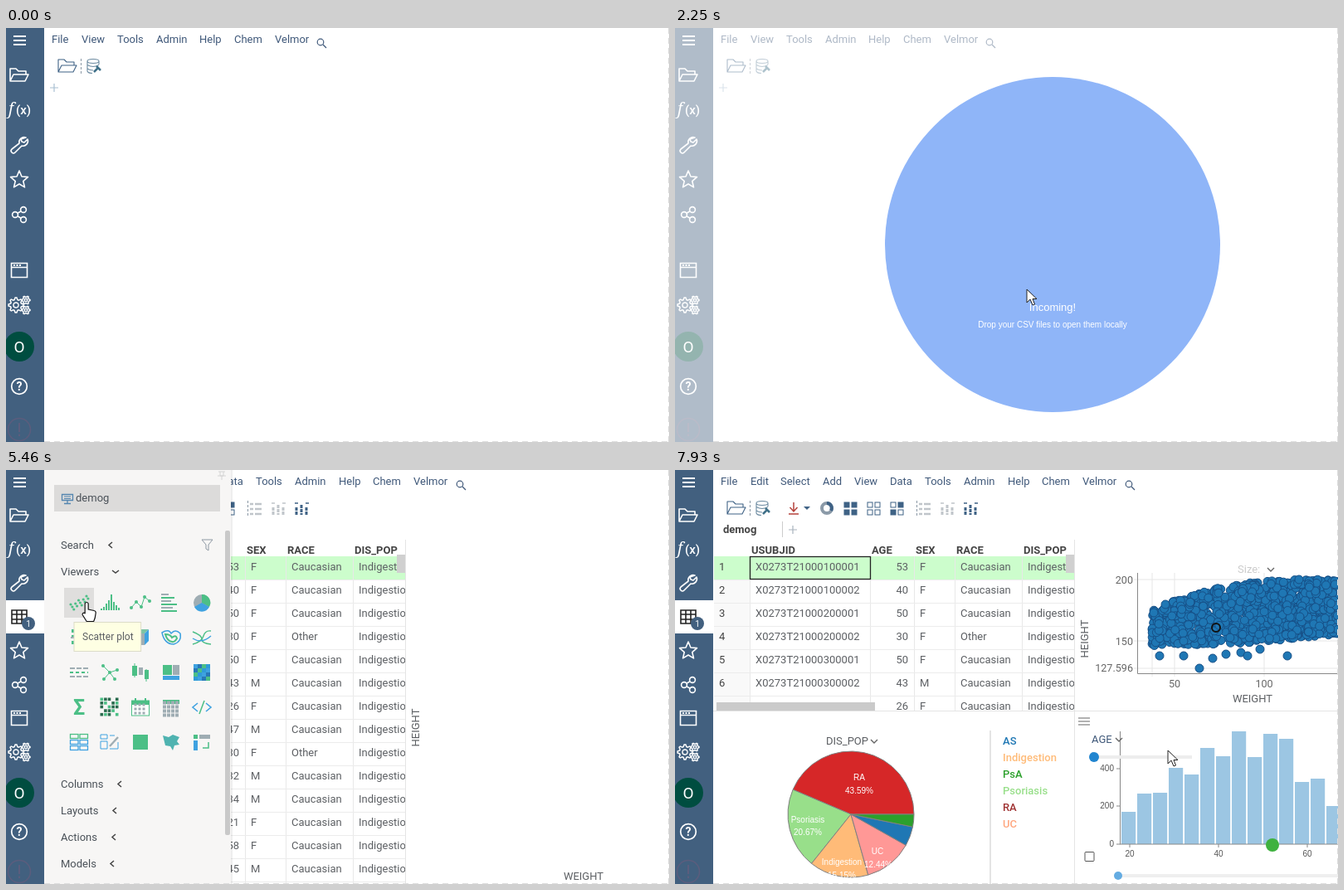
Write an HTML page that moves like this. It is 799 by 499 pixels and loops after 8000 ms.

```html
<!DOCTYPE html>
<html lang="en">
<head>
<meta charset="utf-8">
<title>CSV drop demo</title>
<style>
html, body { margin: 0; width: 100%; height: 100%; overflow: hidden; background: #fff; }
svg { display: block; }
text { font: 13px Roboto, sans-serif; fill: #5c5f63; white-space: pre; }
.b { font-weight: 700; fill: #444; }
.menu { fill: #40597a; }
.panel text { fill: #4a5158; }
.win text { font: 12.6px "Open Sans", sans-serif; fill: #222; }
.win .file { font-size: 14.2px; }
.small { font: 10px "Liberation Sans", Arial, sans-serif; fill: #555; }
.white { fill: #fff; }
.axis { font-size: 12.6px; fill: #666; }
</style>
</head>
<body>
<script>
const R = (x, y, w, h, fill, more = '') => `<rect x="${x}" y="${y}" width="${w}" height="${h}" fill="${fill}" ${more}/>`;
const C = (x, y, r, fill, more = '') => `<circle cx="${x}" cy="${y}" r="${r}" fill="${fill}" ${more}/>`;
const L = (d, color, w = 1, more = '') => `<path d="${d}" stroke="${color}" stroke-width="${w}" fill="none" ${more}/>`;
const T = (x, y, s, more = '') => `<text x="${x}" y="${y}" ${more}>${s}</text>`;
const at = (x, y, s) => `<g transform="translate(${x} ${y})">${s}</g>`;
const G = (id, s, more = '') => `<g id="${id}" ${more}>${s}</g>`;
const range = (n, f) => Array.from({ length: n }, (_, i) => f(i)).join('');
const mid = 'text-anchor="middle"', end = 'text-anchor="end"';
const navy = '#42607f', ink = '#3f6285';

let seed = 7;
const rand = () => (seed = seed * 16807 % 2147483647) / 2147483647;

// ---- left bar ----
function gear(x, y, r, n) {
  const pts = range(n * 4, i => {
    const a = (i - .5) * Math.PI / (2 * n), q = i % 4 < 2 ? r : r * .74;
    return `${i ? 'L' : 'M'}${x + q * Math.cos(a)} ${y + q * Math.sin(a)}`;
  });
  return L(pts + 'Z', '#fff', 1.5) + C(x, y, r * .34, 'none', 'stroke="#fff" stroke-width="1.4"');
}
const star = range(10, i => {
  const a = i * Math.PI / 5 - Math.PI / 2, q = i % 2 ? 5 : 11;
  return `${i ? 'L' : 'M'}${q * Math.cos(a)} ${q * Math.sin(a)}`;
}) + 'Z';
const folder = (color, w) => L('M-11 7V-8h7l3 3h9v4M-11 7l4-8h18l-4 8z', color, w, 'stroke-linejoin="round"');
const sideIcons = {
  menu: L('M-7-5H8M-7 0H8M-7 5H8', '#fff', 1.8),
  folder: folder('#fff', 1.6),
  fx: T(-13, 5, 'f', 'class="white" style="font:italic 19px \'Noto Serif\',serif"') +
      T(-4, 5, '(x)', 'class="white" style="font-size:15px;font-weight:500"'),
  wrench: L('M8-9a6 6 0 0 0-8 7L-9 5a2.7 2.7 0 0 0 4 4L3 1a6 6 0 0 0 7-8L6-3 3-4 2-7z', '#fff', 1.6, 'stroke-linejoin="round"'),
  star: L(star, '#fff', 1.6, 'stroke-linejoin="round"'),
  share: L('M5-6L-5 0L5 6', '#fff', 1.6) +
    [[5, -6], [-5, 0], [5, 6]].map(p => C(...p, 3.4, navy, 'stroke="#fff" stroke-width="1.6"')).join(''),
  window: L('M-9.500-8.500h19v17h-19zM-9-3.500h18', '#fff', 1.6) + range(3, i => R(-7 + i * 3.5, -7, 2, 2, '#fff')),
  gears: gear(-4, 0, 9, 8) + gear(8, -6, 5, 6) + gear(8, 6, 5, 6),
  user: C(0, 0, 18, '#004d40') + T(0, 7, 'O', `class="white" ${mid} style="font-size:19px"`),
  help: C(0, 0, 9.3, 'none', 'stroke="#fff" stroke-width="1.7"') + T(0, 5, '?', `class="white" ${mid} style="font-weight:700;font-size:14px"`),
  alert: C(0, 0, 13.5, 'none', 'stroke="#5b5d7d" stroke-width="1.6"') + L('M0-8V3M0 5.500v2.500', '#5b5d7d', 2),
  table: R(-16, -20, 46, 40, '#fff') + L('M-9-8H9V8H-9zM-9-3H9M-9 3H9M-3-8V8M3-8V8', '#222', 1.6) +
    C(11, 8, 8, navy) + T(11, 11.5, '1', `class="white" ${mid} style="font-size:10px"`),
};
const sidebar = places => R(0, 0, 46, 499, navy) +
  Object.entries(places).map(([k, y]) => at(16, y, sideIcons[k])).join('');

// ---- top of the app ----
const menu = items => Object.entries(items).map(([s, x]) => T(x, 18, s, 'class="menu"')).join('');
const search = x => C(x - 1, 17, 3.8, 'none', 'stroke="#40597a" stroke-width="1.2"') + L(`M${x + 2} 20l4 4`, '#40597a', 1.3);
const dash = x => L(`M${x}.5 37V56`, '#8a97a5', 1, 'stroke-dasharray="3 2"');
const plus = (x, color) => L(`M${x - 5} 72h10M${x} 67v10`, color, 1.2);
const files = at(74, 46, folder(ink, 1.1)) + dash(90) +
  at(106, 46, L('M-8-6a7 2.500 0 0 1 14 0a7 2.500 0 0 1-14 0V6q1 2.500 6 2.500M-8-1.500q7 4 14 0M-8 3q3 2 7 2M6-6v4', '#6c8aa0', 1.1) +
    L('M0 7l5-5M3 0l5 5', '#3f7088', 2.5));
const squares = (x, fills) => range(4, i => R(x - 7 + i % 2 * 9, 39 + (i > 1) * 9, 6, 6, fills.includes(i) ? ink : 'none', `stroke="${ink}"`));
const bars = (x, color) => L(`M${x - 6} 45v9M${x} 42v12M${x + 6} 45v9`, color, 3, 'stroke-dasharray="4 1"') + L(`M${x - 8} 40h4M${x + 5} 40h4`, color, 1.5);
const caret = (x, y) => L(`M${x - 4} ${y - 2}l4 4l4-4`, '#666', 1.4);

const startView = R(46, 0, 753, 499, '#fff') +
  menu({ File: 55, View: 91, Tools: 134, Admin: 181, Help: 233, Chem: 275, Velmor: 324 }) +
  search(380) + files + plus(58, '#a9c0d2') +
  sidebar({ menu: 15, folder: 57, fx: 99, wrench: 141, star: 183, share: 225, window: 292, gears: 334, user: 384, help: 432, alert: 484 });

const tableTop = menu({ File: 55, Edit: 91, Select: 127, Add: 178, View: 216, Data: 259, Tools: 301, Admin: 348, Help: 401, Chem: 442, Velmor: 491 }) +
  search(548) + files +
  L('M143 39v10M138.500 45l4.500 5l4.500-5M137 53h12', '#b5433c', 1.5) + `<path d="M155 44h8l-4 4z" fill="${ink}"/>` +
  C(183, 46, 6, 'none', 'stroke="#8b9aa8" stroke-width="4"') + L('M183 40a6 6 0 0 1 5 9', ink, 4) +
  squares(211, [0, 1, 2, 3]) + squares(239, []) + squares(267, [1, 2]) + dash(291) +
  L('M294 41h4M294 47h4M294 53h4M300 41h8M300 47h8M300 53h8', '#c0c5ca', 2.4) + bars(328, '#c0c5ca') + bars(356, ink) +
  T(58, 76, 'demog', 'class="b"') + L('M129.500 62v19', '#ccc') + plus(142, '#a9b4be');

// ---- grid ----
const rows = `53 F Caucasian 160.484 73.20 0|40 F Caucasian 163.646 93.00 1|50 F Caucasian 158.027 62.70 1
30 F Other 158.419 64.50 1|50 F Caucasian 161.695 67.60 0|43 M Caucasian 188.234 91.00 0|26 F Caucasian 174.705 74.10 0
47 M Caucasian 175.228 85.10 1|30 F Other 150.288 64.00 0|32 M Caucasian 180.298 67.00 1|34 M Caucasian 175.351 115.30 0
21 F Caucasian 155.091 70.50 0|58 F Caucasian 174.066 90.00 1|45 M Caucasian 183.830 67.10 0`.split(/[|\n]/).map(r => r.split(' '));
const ids = [2, 2, 8, 2].flatMap((n, g) => Array.from({ length: n }, (_, i) => `X0273T21000${(g + 1) * 100000 + i + 1}`));
const row = ([age, sex, race, height, weight, on], i) => {
  const y = 121 + i * 28;
  return T(53, y, i + 1, 'style="fill:#444"') + T(97, y, ids[i]) + T(281, y, age, end) + T(295, y, sex) + T(344, y, race) +
    T(425, y, 'Indigestion') + T(566, y, height, end) + T(638, y, weight, end) + T(653, y, `${age} ${race[0]} ${sex}`) +
    R(752.5, y - 9.5, 11, 11, '#fff', 'stroke="#777" rx="1"') + (on > 0 ? L(`M755 ${y - 4}l2.500 2.500l4.500-5`, '#666', 1.3) : '') +
    L(`M47 ${y + 11}.5H799`, '#ececec');
};
const heads = { USUBJID: 92, AGE: 237, SEX: 290, RACE: 339, DIS_POP: 420, HEIGHT: 504, WEIGHT: 575, DEMOG: 648, CONTROL: 718 };
const grid = R(46, 84, 753, 415, '#fff') + R(47, 104, 43, 395, '#f9f9f9') + R(47, 104, 752, 28, '#ccfdcc') +
  G('hover', R(47, 0, 752, 28, '#eef3f8') + R(47, 0, 3, 28, '#66a3c7')) +
  Object.entries(heads).map(([s, x]) => T(x, 101, s, 'class="b"')).join('') +
  [90, 235, 288, 337, 418, 502, 568, 646, 716].map(x => L(`M${x}.5 104V499`, '#e8e8e8')).join('') +
  rows.map(row).join('') + R(90.5, 104.5, 145, 27, 'none', 'stroke="#222" stroke-width="1.3"') +
  G('barFull', R(46, 493, 753, 6, '#d6d6d6'));

// ---- charts ----
const cloud = Array.from({ length: 1050 }, () => {
  const u = rand() ** .85, top = 132 + 38 * (1 - u) ** 3, low = 213 - 16 * u * u;
  return [575 + 226 * u, top + (low - top) * rand()];
}).concat([[632, 239], [648, 227], [613, 224], [584, 224], [738, 224], [577, 172], [664, 222], [682, 220], [690, 224], [705, 216], [591, 162], [752, 132]]);
function scatter(bottom) {
  const Y = y => 124 + (y - 124) * (bottom - 124) / 121, hMid = (124 + bottom) / 2 + 19;
  const ring = (x, y, fill, s) => C(x.toFixed(1), Y(y).toFixed(1), 5, fill, s);
  return {
    names: T(696, bottom + 35, 'WEIGHT', mid) + T(0, 0, 'HEIGHT', `${mid} transform="translate(498 ${hMid}) rotate(-90)"`),
    plot: [132, 206, 239].map(y => L(`M553 ${Y(y)}H799`, '#e6e6e6')).join('') +
      [575, 602, 710].map(x => L(`M${x} 124V${bottom + 4}`, '#e6e6e6')).join('') +
      `<g stroke="#174f86" stroke-width="1">${cloud.map(p => ring(...p, '#1f77b4')).join('')}</g>` +
      ring(652, 190, 'none', 'stroke="#111" stroke-width="2"') +
      L(`M557.500 124V${bottom}.5H799`, '#888') +
      T(552, Y(132) + 5, '200', `class="axis" ${end}`) + T(552, Y(206) + 5, '150', `class="axis" ${end}`) +
      T(552, Y(239) + 4, '127.596', `class="axis" ${end}`) + T(602, bottom + 17, '50', `class="axis" ${mid}`) +
      T(710, bottom + 17, '100', `class="axis" ${mid}`) + T(678, 124, 'Size:', 'style="fill:#ccc"') + caret(718, 120),
  };
}
const tall = scatter(459), half = scatter(245);

const hist = R(482, 291, 317, 208, '#fff') + L('M482 290.500H799', '#e4e4e4') +
  [39, 61, 62, 92, 84, 116, 106, 136, 105, 133, 127, 75, 79, 46].map((h, i) => R(538 + i * 19, 451 - h, 17.2, h, '#9cc6e3')).join('') +
  L('M536.500 315V451H799M532 360h5M532 405h5M532 451h5M548 451v4M655 451v4M762 451v4', '#888') +
  [[363, 400], [408, 200], [454, 0]].map(([y, s]) => T(529, y, s, `class="small" ${end}`)).join('') +
  [20, 40, 60].map((s, i) => T(548 + i * 107, 466, s, `class="small" ${mid}`)).join('') +
  T(502, 329, 'AGE', 'class="menu"') + caret(535, 325) + R(505, 344, 118, 4, '#ededed') + C(505, 346, 6, '#2185d0') +
  C(720, 452, 8, '#3fb23f') + R(494, 460.5, 11, 11, '#fff', 'stroke="#555" rx="1"') +
  G('histTools', L('M486 299h14M486 303h14M486 307h14', '#999', 1.4) + R(534, 487, 265, 4, '#efefef') + C(534, 489, 5, '#64ace2'));

const pieParts = [['#d62728', 43.59], ['#98df8a', 20.67], ['#ffbb78', 15.15], ['#ff9896', 12.44], ['#1f77b4', 4.95], ['#2ca02c', 3.2]];
let turn = 0;
const spot = p => `${212 + 76 * Math.cos(p * Math.PI / 50)} ${415 - 76 * Math.sin(p * Math.PI / 50)}`;
const slices = pieParts.map(([color, share]) => {
  const from = spot(turn);
  turn += share;
  return `<path d="M212 415L${from}A76 76 0 0 0 ${spot(turn)}Z" fill="${color}" stroke="#808080"/>`;
}).join('');
const pie = R(46, 291, 435, 208, '#fff') + L('M46 290.500H481M481.500 290V499', '#e4e4e4') +
  T(182, 331, 'DIS_POP') + caret(240, 327) + slices +
  [['RA', 222, 374], ['43.59%', 222, 390], ['Psoriasis', 160, 425], ['20.67%', 160, 440], ['Indigestion', 201, 476],
   ['15.15%', 201, 492], ['UC', 244, 463], ['12.44%', 245, 479]].map(([s, x, y]) => T(x, y, s, `class="small white" style="fill:#fff" ${mid}`)).join('') +
  L('M380 314V499', '#e4e4e4', 2) +
  [['AS', '#1f77b4'], ['Indigestion', '#ffbb78'], ['PsA', '#2ca02c'], ['Psoriasis', '#98df8a'], ['RA', '#a03434'], ['UC', '#ffa77f']]
    .map(([s, c], i) => T(395, 331 + i * 20, s, `style="fill:${c};font-weight:500"`)).join('');

// ---- viewers panel ----
const gr = '#4cbf86', gy = '#9fadb3', bl = '#3fa2e0';
const matrix = (n, step, size, color) => range(n * n, i => R(-(n * step) / 2 + i % n * step, -(n * step) / 2 + (i / n | 0) * step, size, size, color(i)));
const dots = (pts, color) => pts.map(p => C(...p, 2, color)).join('');
const zigzag = [[-11, 6], [-5, -1], [1, 5], [5, -7], [11, -2]];
const viewers = [
  range(12, i => C(-10 + i * 1.9, 6 - i + ((i * 7) % 5 - 2) * 2, 1.6, gr)),
  [2, 4, 8, 12, 19, 10, 6, 3].map((h, i) => R(-11 + i * 3, 9 - h, 2, h, gr)).join(''),
  L('M' + zigzag.join('L'), gr) + dots(zigzag, gr),
  [9, 16, 12, 19, 14, 19].map((w, i) => R(-12, -11 + i * 4, w, 2, i % 2 ? gr : gy)).join(''),
  C(0, 0, 10, gy) + `<path d="M0 0V-10A10 10 0 0 1 9 5z" fill="${gr}"/><path d="M0 0L9 5A10 10 0 0 1-9 5z" fill="${bl}"/>`,
  L('M-7-10V10M0-10V10M7-10V10', gr, 4, 'stroke-dasharray="4 3"') + L('M-10 0H10', gy, 2),
  matrix(5, 4.4, 3, i => i % 3 ? gy : gr),
  R(-10, -5, 15, 14, gy) + `<path d="M-10-5l5-5H10L5-5z" fill="#7cc4a4"/><path d="M5-5l5-5V4L5 9z" fill="${bl}"/>`,
  L('M-11-6q8-5 11 1q5-6 11 0q2 10-8 13Q-8 8-11-6z', bl, 1.5) + L('M-7-4q6 0 8 4q5-4 6 1q-3 5-6 4Q-5 4-7-4z', gr, 2),
  L('M-11-7Q0-3 0 2T11 8M-11 8Q0 5 2-2T11-8', gr, 1.4) + L('M-11 1Q0 8 11-2', bl, 1.4),
  L('M-11-5H11M-11 5H11', gy, 2, 'stroke-dasharray="6 2"') + L('M-11 0H11', gr, 2, 'stroke-dasharray="4 3"'),
  L('M-8-8L0 0L9-3M0 0L-7 8M0 0L6 8', gr) + dots([[-8, -8], [0, 0], [9, -3], [-7, 8], [6, 8]], gr),
  L('M-7-11V6M7-4V11', gr) + R(-10, -8, 6, 12, gr) + R(-2, -6, 5, 9, gy) + R(5, -3, 5, 11, gr),
  R(-10, -9, 11, 12, gr) + R(2, -9, 8, 12, gy) + R(-10, 4, 20, 5, bl),
  matrix(4, 5, 5, i => [bl, '#2878b8', gr, '#2f9bd8'][(i * 5 + (i >> 2)) % 4]),
  T(0, 9, 'Σ', `${mid} style="font:700 25px Roboto,sans-serif;fill:${gr}"`),
  matrix(5, 4.6, 3.6, i => i * 7 % 4 === 1 ? '#fff0' : i % 3 ? '#2a6b4e' : gr),
  R(-10.5, -8, 21, 18, '#fff', `stroke="${gr}"`) + R(-11, -8, 22, 5, gr) + at(0, 3, matrix(3, 5, 3, () => gy)) + L('M-6-11v4M6-11v4', gr, 2),
  R(-10, -9, 20, 5, gr) + at(0, 2.5, matrix(4, 5, 4, () => gy)),
  L('M-5-5l-6 5l6 5M5-5l6 5l-6 5', bl, 1.6) + L('M3-8L-3 8', gr, 1.6),
  range(6, i => R(-10.5 + i % 2 * 11.5, -9.5 + (i / 2 | 0) * 7, 9.5, 5, 'none', `stroke="${i < 2 ? gr : bl}" stroke-width="1.3"`)),
  L('M-11-9h8v5h-8zM-11-1h8v9h-8zM0 8h10V0M0-8h6', bl) + L('M0 5L10-6', gy, 2.4),
  R(-9, -9, 18, 18, gr),
  '<path d="M-10-8l7 2l5-3l8 3l-3 5l3 4l-6 1l-2 6l-3-5l-6-1z" fill="#4fb3b0"/>',
  R(-10, -9, 5, 5, gr) + R(-3, -9, 13, 5, gy) + R(-10, -2, 5, 12, bl) + L('M1 7h7V0', gr, 1.5),
];
const section = (s, y, x, open) => T(66, y + 4.5, s) + L(open ? `M${x - 3} ${y - 1}l4 3l4-3` : `M${x + 2} ${y - 3}l-4 3.500l4 3.500`, '#444', 1.5);
const panel = R(46, 0, 225, 499, '#f7f6f5') + R(271, 0, 2, 499, '#0001') + R(58, 18, 200, 32, '#dcdbda') +
  L('M67.500 29.500h13v7h-13zM74 37v3M70 40.500h8', '#5486b0', 1.3) + L('M70 32h8M70 34.500h8', '#5486b0') + T(84, 38, 'demog') +
  section('Search', 90, 126) + section('Viewers', 122, 131, true) + section('Columns', 378, 137) + section('Layouts', 410, 131) +
  section('Actions', 442, 130) + section('Models', 474, 128) +
  L('M236 84h13l-5 6v7l-3-2v-5z', '#8d98a3') + L('M256 2h8M258 2v5h4V2M255 7h10M260 7v5', '#d4d4d4') +
  G('cell', R(70, 142, 36, 36, '#dfdedd')) +
  viewers.map((s, i) => at(88 + i % 5 * 37, 160 + (i / 5 | 0) * 42, s)).join('') +
  G('panelBar', R(264, 73, 6, 367, '#c9c9c9', 'rx="2"'));

// ---- file window ----
const yellowFolder = (x, y) => `<path d="M${x - 6} ${y - 8}h10l2 3v12h-12z" fill="#f7d271"/>` + R(x - 6, y - 4, 9, 12, '#ffe39a');
const sheet = (x, y) => `<path d="M${x} ${y}h10l4 4v14h-14z" fill="#fff" stroke="#888"/>`;
const thumb = (y, wide) => R(728, y - 7, 17, 13, '#fff', 'stroke="#555"') + R(730, y - 5, wide ? 13 : 6, 5, '#6aa5d8') + R(730, y, wide ? 13 : 6, 4, '#5b6b4b');
const win = R(606, 5, 193, 494, '#0002') + R(608, 7, 191, 492, '#fff', 'stroke="#999"') +
  yellowFolder(626, 27) + L('M643.500 19v16M731.500 19v16', '#777') + R(659.5, 18.5, 13, 16, '#fff', 'stroke="#8a6a4a"') +
  L('M662 27l3 4l6-8', '#d07a2a', 2) + yellowFolder(691, 27) + L('M709.500 25h8', '#222') + '<path d="M710 28h7l-3.500 4z" fill="#222"/>' +
  T(738, 32, 'Plomrix files', 'class="file"') +
  R(609, 45, 70, 28, '#0566c4') + T(643, 64, 'File', `${mid} style="fill:#fff"`) + T(713, 64, 'Home', mid) + T(766, 64, 'Share') +
  R(609, 73, 190, 114, '#f5f6f7') + L('M609 73.500H799M609 187H799M719.500 78V182', '#dcdcdc') +
  R(632, 87, 35, 28, '#fff', 'stroke="#777"') + R(633, 92, 14, 22, '#3e97dc') + R(632, 87, 35, 4, '#9aa4ac') +
  [94, 131].map(y => R(688.5, y, 17, 13, '#fff', 'stroke="#888"') + R(697, y + 3, 8, 9, '#4a97d2')).join('') +
  T(650, 138, 'Navigation', mid) + T(630, 155, 'pane') + '<path d="M662 148h7l-3.500 4z" fill="#333"/>' + T(663, 180, 'Panes', mid) +
  R(723.5, 81.5, 90, 74, '#fff', 'stroke="#d5d5d5"') + thumb(94, true) + thumb(118, false) +
  L('M728 136h4v4h-4zM728 145h4v4h-4zM738 136h4v4h-4zM738 145h4v4h-4z', '#4a7fae', 1.4) + L('M733 138h3M733 147h3M743 138h3M743 147h3', '#444') +
  T(751, 99, 'Extra large icons') + T(751, 123, 'Medium icons') + T(751, 147, 'List') +
  L('M640 212h-14M632 206l-6 6l6 6M727 219v-13M721 211l6-6l6 6', '#555', 1.5) + L('M664 212h14M672 206l6 6l-6 6', '#d0d0d0', 1.5) +
  L('M698 210l4 4l4-4M781 243l5-4l5 4', '#666', 1.3) + R(743.5, 192.5, 80, 38, '#fff', 'stroke="#d0d0d0"') +
  yellowFolder(755, 212) + T(773, 216, '«', 'class="file"') + T(791, 217, 'Projects', 'class="file"') +
  T(630, 260, 'Name', 'class="file" style="fill:#5b6b75"') +
  G('pick', R(627.5, 305.5, 180, 27, '#cce8ff', 'stroke="#99d1ff"')) +
  ['calendar', 'demog', 'earnings-by-state', 'gapminder'].map((s, i) => sheet(636, 282 + i * 27) + T(657, 298 + i * 27, s + '.csv', 'class="file"')).join('');

const dropZone = R(0, 0, 799, 499, '#fff', 'opacity=".58"') + C(455, 261, 202, '#8fb5f8', 'id="disc"') +
  T(455, 341, 'Incoming!', `${mid} class="small" style="font-size:13px;fill:#fff"`) +
  T(455, 361, 'Drop your CSV files to open them locally', `${mid} class="small" style="fill:#fff"`);

const ghost = '<g opacity=".9">' + R(-46, -114, 131, 130, '#0002', 'rx="2"') + R(-47.5, -115.5, 130, 130, 'url(#ice)', 'stroke="#a8cfe6" rx="2"') +
  '<path d="M-22-105h57l23 23V4h-80z" fill="#f6f8f9" stroke="#a5b0b8"/><path d="M35-105v23h23z" fill="#dde4e8" stroke="#a5b0b8"/></g>' +
  R(31.5, 16.5, 67, 24, '#fff', 'stroke="#777"') + L('M37 28.500h14M44 21.500v14', '#1a6ac0', 2) +
  T(56, 34, 'Copy', 'style="font:14.6px \'Open Sans\',sans-serif;fill:#1c5fb0"');
const pointer = G('click', C(-1, -2, 15, '#f7ee60', 'opacity=".85"')) +
  G('arrow', '<path d="M0 0V16l4-4l3 7l2.500-1L7 11.500h5z" fill="#fff" stroke="#222"/>') +
  G('hand', '<path d="M-2 1.500a2 2 0 0 1 4 0V8l7 1.500a2.500 2.500 0 0 1 2 3l-1 6l-1.500 4H0l-5-8a1.800 1.800 0 0 1 2.700-2l.3.800z" fill="#fff" stroke="#111" stroke-width="1.2"/>');
const tip = G('tip', R(0, 183.5, 79, 35, '#feffe3', 'id="tipBox" stroke="#dcdcc8"') + T(10, 205, '', 'id="tipText" style="font-size:12px"'));

document.body.innerHTML = `<svg width="799" height="499" viewBox="0 0 799 499"><defs>
<linearGradient id="ice" x2="0" y2="1"><stop stop-color="#eef7fc"/><stop offset="1" stop-color="#d6ebf8"/></linearGradient>
<clipPath id="clip"><rect id="clipBox" x="46" y="84" width="753" height="415"/></clipPath></defs>` +
  G('start', startView) +
  G('app', R(46, 0, 753, 499, '#fff') + tableTop + G('grid', grid, 'clip-path="url(#clip)"') +
    G('split', L('M481.500 84V499', '#e4e4e4') + R(471, 102, 10, 22, '#d0d0d0')) +
    G('tallNames', tall.names) + G('tallPlot', tall.plot) + G('half', half.names + half.plot + hist) +
    G('pie', pie + R(50, 280, 191, 10, '#cacaca')) + G('panel', panel, 'class="panel"') +
    sidebar({ menu: 15, folder: 55, fx: 96, wrench: 136, star: 218, share: 259, window: 299, gears: 340, user: 389, help: 436, alert: 484, table: 177 })) +
  G('drop', dropZone) + L('M46 498.500H799M798.500 0V499', '#dedede', 1, 'stroke-dasharray="7 5"') +
  G('win', win, 'class="win"') + tip + G('mouse', G('ghost', ghost) + pointer) + '</svg>';

// ---- motion ----
const $ = id => document.getElementById(id);
const show = (id, on) => $(id).style.display = on ? '' : 'none';
const move = (id, x, y) => $(id).setAttribute('transform', `translate(${x} ${y})`);
const path = [[850, 785, 460], [1150, 735, 395], [1450, 687, 320], [1600, 687, 320], [1910, 495, 315], [2250, 424, 315], [3230, 424, 315],
  [3440, 255, 229], [3710, 40, 150], [3900, 18, 178], [4640, 22, 182], [4780, 97, 160], [5460, 97, 160], [5660, 132, 160],
  [6150, 132, 160], [6520, 252, 165], [7200, 252, 165], [7500, 390, 250], [7860, 594, 338], [8000, 594, 338]];
const tips = [[4980, 5500, 82, 'Scatter plot'], [5810, 6100, 117, 'Histogram'], [6870, 7150, 250, 'Pie chart']];

function tween(t, keys) {
  const i = keys.findIndex(k => k[0] > t);
  if (i <= 0) return keys[i ? keys.length - 1 : 0].slice(1);
  const a = keys[i - 1], b = keys[i], k = (t - a[0]) / (b[0] - a[0]);
  return a.slice(1).map((v, n) => v + (b[n + 1] - v) * k);
}

function draw(t) {
  const [x, y] = tween(t, path), app = t >= 2600;
  const docked = t >= 5340, halved = t >= 6150, pied = t >= 7150;
  show('start', !app);
  show('app', app);

  show('win', t >= 460 && t < 2190);
  $('win').style.opacity = t < 520 ? .5 : 1;
  show('pick', t >= 1600 || (t >= 1300 && y < 333));
  $('pick').style.opacity = t < 1600 ? .5 : 1;

  const [k] = tween(t, [[1880, 0], [2180, 1], [2430, 1], [2900, 0]]);
  show('drop', k > 0);
  $('drop').style.opacity = k;
  $('disc').setAttribute('r', 207.5 - 5.5 * k);

  const line = Math.floor((y - 104) / 28);
  show('hover', app && t < 3850 && line > 0 && x > 46);
  move('hover', 0, 104 + line * 28);
  $('clipBox').setAttribute('width', docked ? 435 : 753);
  $('clipBox').setAttribute('height', pied ? 206 : 415);
  show('barFull', !docked);
  show('split', docked);
  show('tallNames', docked && !halved);
  show('tallPlot', t >= 5520 && !halved);
  show('half', halved);
  show('pie', pied);
  show('histTools', t >= 7150 && x > 482 && y > 290);

  const [slide] = tween(t, [[3990, -227], [4300, 0], [7400, 0], [7620, -227]]);
  show('panel', slide > -227);
  move('panel', slide, 0);
  show('panelBar', t >= 4710);
  const onIcon = t > 4640 && t < 7300 && x > 70 && x < 258 && y < 178;
  show('cell', onIcon);
  move('cell', Math.round((x - 95) / 37) * 37, 0);

  const note = tips.find(n => t >= n[0] && t < n[1]);
  show('tip', note);
  if (note) {
    move('tip', note[2], 0);
    $('tipText').textContent = note[3];
    $('tipBox').setAttribute('width', $('tipText').getComputedTextLength() + 19);
  }

  show('mouse', t >= 850);
  move('mouse', x, y);
  show('ghost', t >= 1680 && t < 2190);
  show('click', t >= 1600 && t < 2190);
  show('hand', onIcon);
  show('arrow', !onIcon);
}

const began = performance.now();
function tick() {
  draw((performance.now() - began) % 8000);
  requestAnimationFrame(tick);
}
tick();
</script>
</body>
</html>
```
